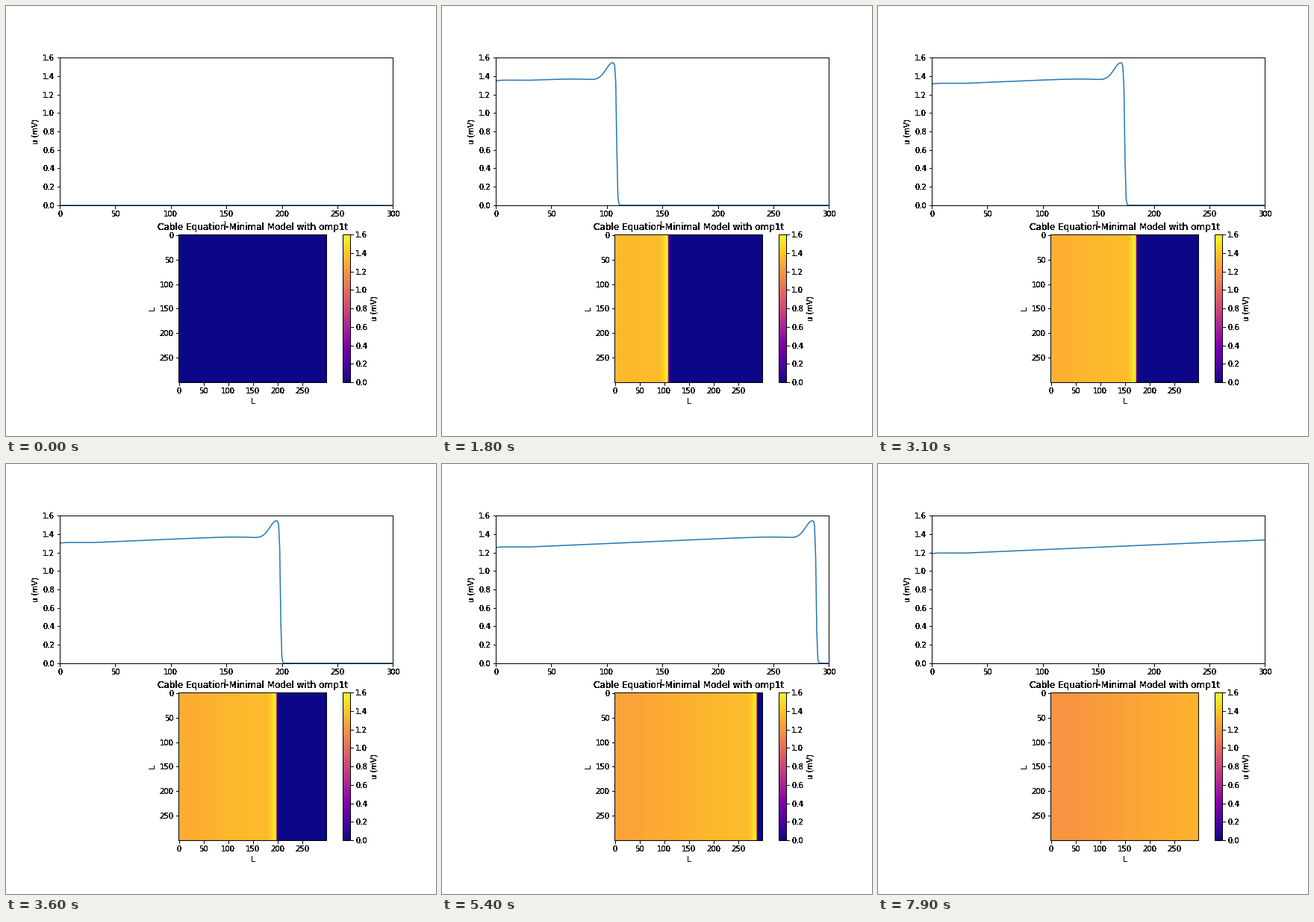
A matplotlib script for the animation above (8 s loop, 576 by 576 pixels).

```python
import numpy as np
import matplotlib.pyplot as plt
from matplotlib.animation import FuncAnimation

plt.rcParams.update({
    "figure.dpi": 72,
    "savefig.dpi": 72,
    "figure.subplot.bottom": 0.125,
    "font.family": "DejaVu Sans",
    "font.size": 10,
    "axes.linewidth": 1.0,
})

N = 300        # cells along the cable
SPEED = 4.99   # cells per step
START = 24.0   # virtual front position at step 0
STIM = 29      # edge of the stimulated stretch
x = np.arange(N)


def sigmoid(z):
    return 1 / (1 + np.exp(-np.clip(z, -60, 60)))


def action_potential(d):
    """Voltage at a distance d behind the front."""
    d = np.maximum(d, -15.0)
    plateau = 1.397 - 0.00053 * d - 0.103 * np.exp(-d / 16)
    spike = 0.235 * np.exp(-((d - 2.5) / 6.8) ** 2 / 2)
    return (plateau + spike) * sigmoid(d / 0.42)


def voltage(step):
    if step == 0:
        return np.zeros(N)
    wave = action_potential(START + SPEED * step - x)
    stim = action_potential(SPEED * step - 2) + 0.003
    mix = sigmoid(STIM - x)
    u = mix * stim + (1 - mix) * wave
    edges = 0.009 * np.exp(-x / 2.5) + 0.003 * np.exp(-(N - 1 - x) / 1.5)
    return np.maximum(u - edges * (u > 0.5), 0)


def harden(img, dpi):
    """Turn soft glyph edges into solid pixels."""
    out = img.copy()
    out[..., 3] = img[..., 3] > 0.2
    return out, 0, 0


fig = plt.figure(figsize=(8, 8), facecolor="white")

top = fig.add_subplot(2, 1, 1)
line, = top.plot(x, voltage(0))
top.set(xlim=(0, N), ylim=(0, 1.6), xlabel="L", ylabel="u (mV)")

low = fig.add_subplot(2, 1, 2)
heat = low.imshow(np.zeros((N, N)), cmap="plasma", vmin=0, vmax=1.6)
low.set(xlabel="L", ylabel="L")
low.set_xticks(range(0, N, 50))
low.set_yticks(range(0, N, 50))
title = low.set_title("Cable Equation-Minimal Model with omp1t")
bar = fig.colorbar(heat, ax=low, label="u (mV)")

for artist in (top.xaxis, top.yaxis, low.xaxis, low.yaxis,
               bar.ax.yaxis, title):
    artist.set_agg_filter(harden)


def update(i):
    u = voltage(max(i - 1, 0))  # the resting state holds for two ticks
    line.set_ydata(u)
    heat.set_data(np.tile(u, (N, 1)))
    return line, heat


anim = FuncAnimation(fig, update, frames=80, interval=100,
                     init_func=lambda: update(0), repeat=True,
                     repeat_delay=0, blit=False)
plt.show()
```
